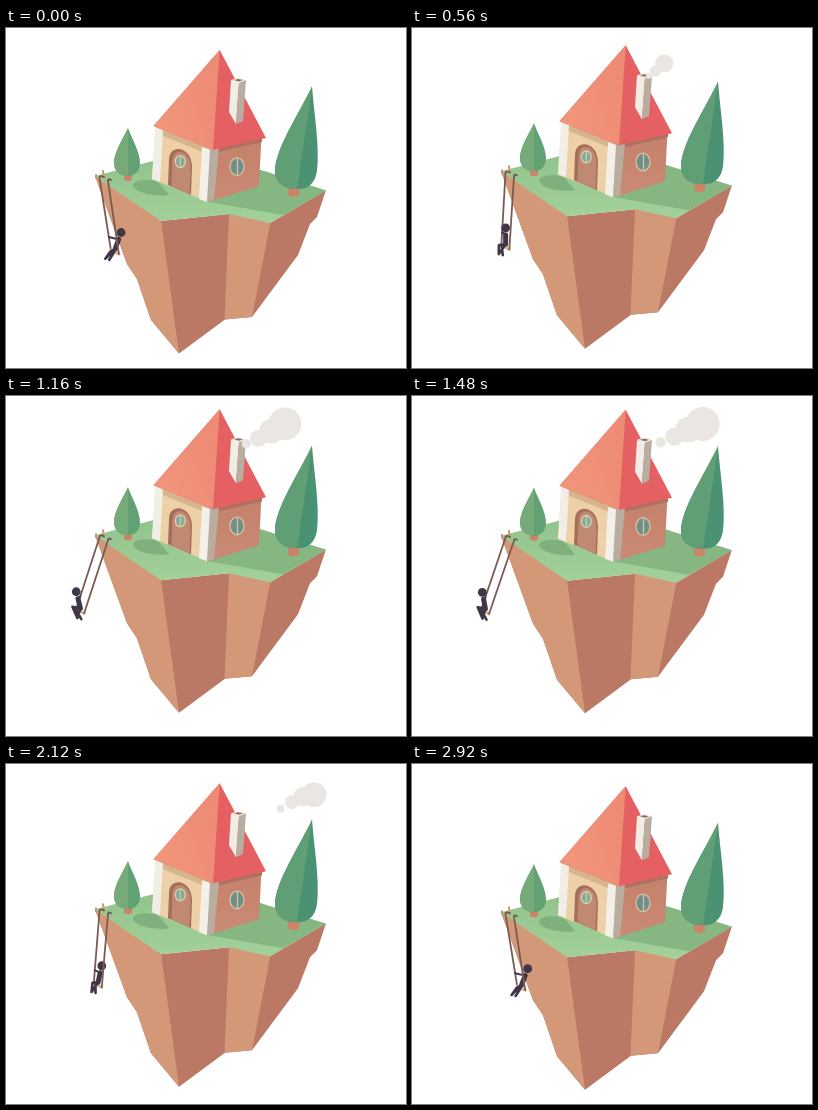
These frames come from a looping animation (400x340 px, 2960 ms). An HTML page:

```html
<!DOCTYPE html>
<html lang="en">
<head>
<meta charset="utf-8">
<title>Floating house</title>
<style>
  html, body { margin: 0; width: 100%; height: 100%; overflow: hidden; background: #fff; }
  svg { display: block; width: 100vw; height: 100vh; }
</style>
</head>
<body>
<svg viewBox="0 0 400 340">
  <defs>
    <linearGradient id="roof" x1="0" y1="1" x2="1" y2="0.5">
      <stop offset="0" stop-color="#f1977c"/><stop offset="1" stop-color="#ee8b75"/>
    </linearGradient>
    <linearGradient id="brick" x1="0" y1="0" x2="0" y2="1">
      <stop offset="0" stop-color="#c4806c"/><stop offset="1" stop-color="#ca8a73"/>
    </linearGradient>
    <linearGradient id="lawn" x1="0" y1="0" x2="0" y2="1">
      <stop offset="0" stop-color="#93c38d"/><stop offset="1" stop-color="#a2d199"/>
    </linearGradient>
  </defs>
  <g id="world">
    <g id="cliff">
      <path fill="#ba7865" d="M89 148L155 193L223 186L264 195L320 162L311 189L304 196L292 227L246 289L219 291.5L173 325.5L145 292L131 251L121 236Z"/>
      <path fill="#d39877" d="M89 148L155 192L173 325.5L145 292L131 251L121 236Z"/>
      <path fill="#d39877" d="M223 185L264.5 194L246 289L218.5 291.5Z"/>
    </g>
    <path fill="url(#lawn)" d="M89 148L147 133L255 142L320 162.5L264 195L223 186L155 193Z"/>
    <path fill="#86b682" d="M203 174L277 187L320 162.5L254 142Z"/>
    <path fill="#80b07d" d="M163 167C149 169 128 165 127 157C128 151 148 150 154 156Z"/>

    <g id="smallTree">
      <path fill="#cc8468" d="M118 144H126V152Q122 154 118 152Z"/>
      <path fill="#62a173" d="M122 100C117 111 108 124 108 135C108 143 114 148 122 148C129 148 134 143 134 135C134 124 126 111 122 100Z"/>
      <path fill="#76ab79" d="M122 100C117 111 108 124 108 135C108 143 114 148 122 148Z"/>
    </g>

    <g id="house">
      <path fill="#edd0a6" d="M150 96L205 119L202 174L146 151Z"/>
      <path fill="#d6b58c" d="M150 97L204 119V127L150 105Z"/>
      <path fill="#f1eee6" d="M149 98L157 102L154 154L146 151Z"/>
      <path fill="url(#brick)" d="M204 119L255.5 108L253 158L202 174Z"/>
      <path fill="#ac7160" d="M204 120L256 109V114L204 126Z"/>
      <path fill="#f3f0e9" d="M196 119L205 122L201 174L193 171Z"/>
      <path fill="#b9ad9f" d="M204 121L213 120L208 172L201 174Z"/>
      <path fill="#a56e5c" d="M162 157L163 132C163 115 186 118 186 139L185 167Z"/>
      <path fill="#c08a72" d="M165.5 158L166.5 133C167 118 185 122 184.5 140L183.5 166Z"/>
      <ellipse cx="174.3" cy="133.5" rx="5" ry="6" fill="#84ac9b" stroke="#e4d0a8" stroke-width="1.2"/>
      <path stroke="#e4d0a8" d="M174.3 128V139"/>
      <ellipse cx="231" cy="138.7" rx="7" ry="8.8" fill="#6d908b" stroke="#dcc09b" stroke-width="1.3"/>
      <path stroke="#dcc09b" stroke-width="1.3" d="M231.5 130V147"/>
      <path fill="#e46062" d="M213.7 22L147.5 98L207 122L260 110Z"/>
      <path fill="url(#roof)" d="M213.7 22L147.5 98L207 122Z"/>
      <path fill="#f0ede5" d="M225 52L233 54L230 96L223 84Z"/>
      <path fill="#b9ada0" d="M233 54L240 52L237 93L230 96Z"/>
      <path fill="#eeeae1" d="M225 52L232 50L240 52L233 55Z"/>
      <path fill="#8d6a5c" d="M228 52L232 51L237 52L233 53.5Z"/>
    </g>

    <g id="tallTree">
      <path fill="#cc8468" d="M282 158H293V167Q288 171 282 167Z"/>
      <path fill="#4b9272" d="M306 58.5C293 86 269 121 269 143C269 155 278 161 291 161C303 161 309 155 311 143C314 119 308 86 306 58.5Z"/>
      <path fill="#609e76" d="M306 58.5C293 86 269 121 269 143C269 155 278 161 291 161Z"/>
    </g>

    <g id="swing" fill="none" stroke-linecap="round" stroke-linejoin="round">
      <path stroke="#cf9470" stroke-width="2" d="M97 143L98 150M90 147V150"/>
      <path stroke="#70534d" stroke-width="1.7" d="M93.5 150Q93 147 98 149M102 153Q102 150 105 152"/>
      <path id="backRope" stroke="#7b5b52" stroke-width="1.8"/>
      <path id="seat" stroke="#deb58e" stroke-width="3"/>
      <path id="legs" stroke="#403648" stroke-width="2.6"/>
      <path id="torso" stroke="#403648" stroke-width="5"/>
      <path id="arm" stroke="#403648" stroke-width="2"/>
      <circle id="head" r="4.4" fill="#403648"/>
      <path id="frontRope" stroke="#7b5b52" stroke-width="1.8"/>
    </g>
  </g>
  <g id="smoke" fill="#eae7e2"></g>
</svg>
<script>
const LOOP = 2960;
const PUFFS = 4;
const el = id => document.getElementById(id);
const wave = (t, peak) => Math.cos((t - peak) / LOOP * 2 * Math.PI);
const add = (p, x, y) => [p[0] + x, p[1] + y];
const mix = (a, b, k) => a.map((v, i) => v + (b[i] - v) * k);
const line = (id, ...points) => el(id).setAttribute("d", "M" + points.map(p => p.join(" ")).join("L"));

function set(node, attrs) {
  for (const name in attrs) node.setAttribute(name, attrs[name]);
}

const circles = Array.from({ length: PUFFS }, () => {
  const circle = document.createElementNS("http://www.w3.org/2000/svg", "circle");
  el("smoke").append(circle);
  return circle;
});

// The rider leans slightly ahead of the swing and kicks the legs out with it.
function drawSwing(t) {
  const swing = wave(t, 2840), lean = wave(t, 2660);
  const seat = [95 + 18.5 * swing, 226], backSeat = add(seat, -8, -4);
  const backTop = [93.5, 150], frontTop = [102, 153];
  const hip = add(seat, -3.7, -5);
  const knee = add(hip, -6.3 + 1.7 * lean, 0.5 + 2.2 * swing);
  const foot = add(hip, -6.4 - 3.6 * swing, 9.8);
  const head = add(hip, 1.4 + 5.6 * lean, -16.5);
  const shoulder = mix(head, hip, 0.42);

  line("backRope", backTop, backSeat);
  line("frontRope", frontTop, seat);
  line("seat", backSeat, seat);
  line("legs", hip, knee, foot, hip, add(knee, 3, 2), add(foot, 4, 1));
  line("torso", shoulder, hip);
  line("arm", shoulder, mix(backTop, backSeat, 0.82));
  set(el("head"), { cx: head[0], cy: head[1] });
}

// Each later puff is smaller, sets off later and lags more on the way.
function drawSmoke(t) {
  circles.forEach((circle, i) => {
    const begin = 200 + 90 * i, end = 2940 - 30 * i;
    const u = Math.min(Math.max((t - begin) / (end - begin), 0), 1);
    const along = u + (0.8 - 0.6 * i) * u * (1 - u);
    const sag = (5.5 * i - 6) * Math.sin(Math.PI * along);
    set(circle, {
      cx: 233 + 86.5 * along,
      cy: 33 + 17 * (1 - along) ** 4 + sag,
      r: Math.max((17 - 3.9 * i) * Math.sin(Math.PI * u ** 0.85), 0)
    });
  });
}

let start;
function frame(now) {
  start ??= now;
  const t = (now - start) % LOOP;
  const lift = 4.7 * (wave(t, 2720) - wave(0, 2720));
  set(el("world"), { transform: `translate(0 ${lift.toFixed(2)})` });
  drawSwing(t);
  drawSmoke(t);
  requestAnimationFrame(frame);
}
requestAnimationFrame(frame);
</script>
</body>
</html>
```
